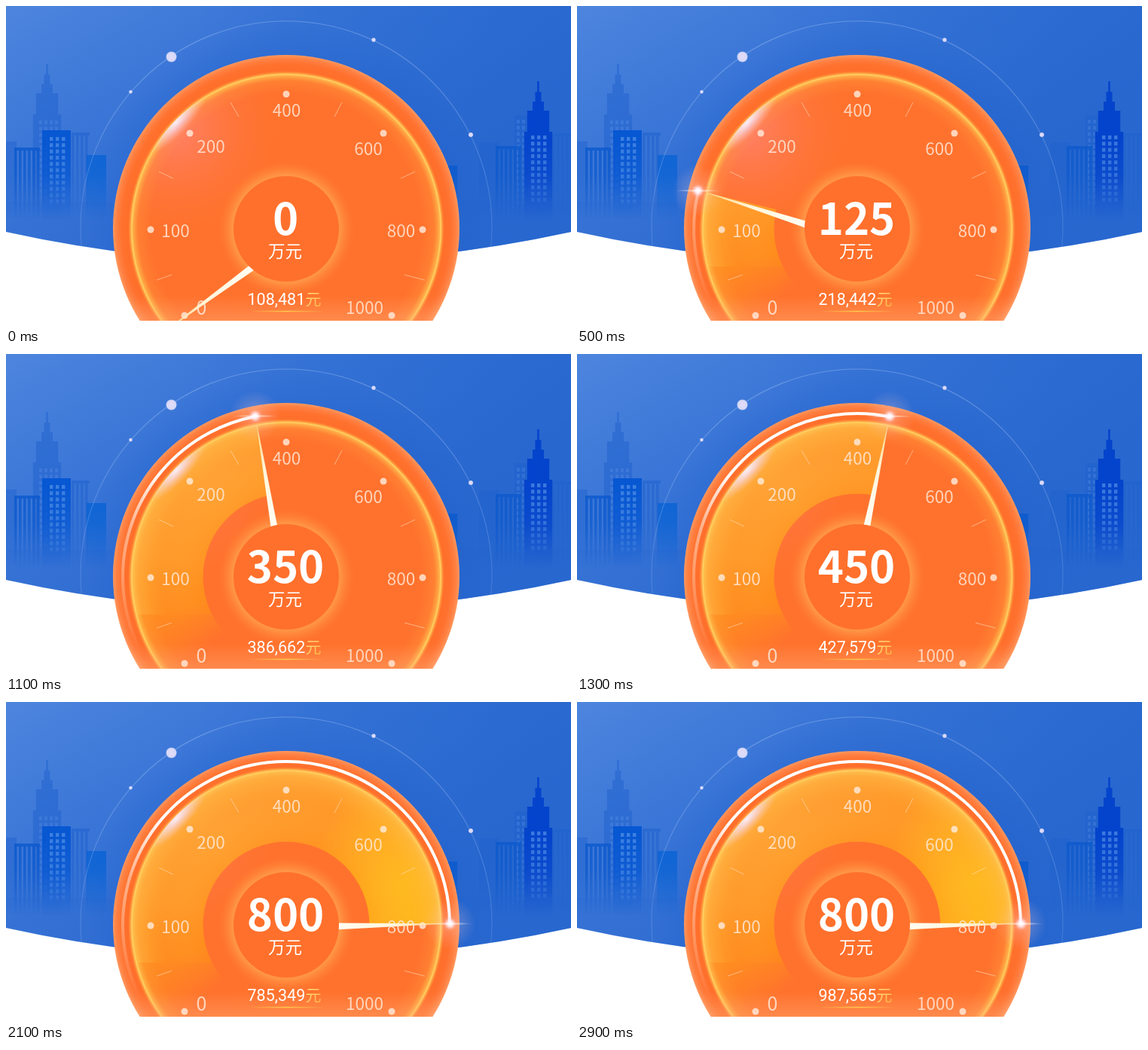
Write an HTML page with a canvas that moves like this. It is 750x425 px and loops after 3000 ms.

```html
<!DOCTYPE html>
<html lang="zh">
<head>
<meta charset="utf-8">
<title>Gauge</title>
<style>
html, body { margin: 0; width: 100%; height: 100%; overflow: hidden; background: #fff; }
canvas { display: block; width: 750px; height: 425px; }
</style>
</head>
<body>
<canvas id="stage" width="750" height="425"></canvas>
<script>
const g = document.getElementById('stage').getContext('2d');
const W = 750, H = 425, CX = 372, CY = 296, FLOOR = 418;
const LOOP = 3000, STEP = 100;
const CJK = '"Noto Sans CJK SC", "Noto Sans CJK", sans-serif';
const DIGITS = 'Roboto, "Liberation Sans", sans-serif';

// [ms, needle foot angle, needle tip angle]; degrees clockwise from due left
const POSES = [[0, -48.6, -40.3], [500, 4.9, 13.5], [800, 39.8, 45.6],
  [1300, 100.8, 101.4], [1700, 147, 145], [2000, 181.5, 179.6]];
const VALUE = [[0, 0], [800, 200], [2000, 800]];
const AMOUNT = [[0, 108481], [500, 218442], [800, 325286], [1300, 427579],
  [1700, 614349], [2100, 785349], [2900, 987565]];

function sample(table, t, col = 1) {
  let i = 1;
  while (i < table.length - 1 && t > table[i][0]) i++;
  const a = table[i - 1], b = table[i];
  const k = Math.min(1, (t - a[0]) / (b[0] - a[0]));
  return a[col] + (b[col] - a[col]) * k;
}

const rad = deg => (deg + 180) * Math.PI / 180;
const polar = (r, deg) => [CX + r * Math.cos(rad(deg)), CY + r * Math.sin(rad(deg))];

function withStops(grad, stops) {
  stops.forEach(([k, c]) => grad.addColorStop(k, c));
  return grad;
}
const linear = (x0, y0, x1, y1, ...s) => withStops(g.createLinearGradient(x0, y0, x1, y1), s);
const radial = (x, y, r0, r1, ...s) => withStops(g.createRadialGradient(x, y, r0, x, y, r1), s);
const conic = (...s) => withStops(g.createConicGradient(rad(-60), CX, CY),
  s.map(([deg, c]) => [(deg + 60) / 360, c]));

function disc(x, y, r, fill) {
  g.fillStyle = fill;
  g.beginPath();
  g.arc(x, y, r, 0, Math.PI * 2);
  g.fill();
}

function line(x0, y0, x1, y1, stroke, width) {
  g.strokeStyle = stroke;
  g.lineWidth = width;
  g.beginPath();
  g.moveTo(x0, y0);
  g.lineTo(x1, y1);
  g.stroke();
}

function text(str, x, y, font, fill, align = 'center') {
  g.font = font;
  g.fillStyle = fill;
  g.textAlign = align;
  g.fillText(str, x, y);
}

// ---- skyline ----
const fade = (rgb, a) => linear(0, 175, 0, 285, [0, `rgba(${rgb},${a})`],
  [.45, `rgba(${rgb},${a * .8})`], [1, `rgba(${rgb},0)`]);

function block(x, y, w, h, rgb, a) {
  g.fillStyle = fade(rgb, a);
  g.fillRect(x, y, w, h);
}

function windows(x, y, cols, dx, rgb = '95,155,235', a = .6) {
  g.fillStyle = fade(rgb, a);
  for (let row = y; row < 262; row += 8.3)
    for (let c = 0; c < cols; c++) g.fillRect(x + c * dx, row, dx * .55, 5);
}

function stripes(x, y, w, rgb, a) {
  block(x, y, w, 4, rgb, a);
  for (let i = 0; i < w; i += 6) block(x + i, y + 4, 3.6, 285 - y, rgb, a);
}

function tower(x, y, s, rgb, a) {
  const tiers = [[1.3, 0, 14], [4, 14, 13], [7.5, 27, 12], [14.7, 39, 28], [18.7, 67, 150]];
  tiers.forEach(([half, top, h]) => block(x - half * s, y + top, half * 2 * s, h, rgb, a));
}

function skyline() {
  const mid = '14,92,210', pale = '30,96,205';
  block(0, 180, 14, 105, pale, .45);
  tower(54.5, 77, 1, pale, .5);
  windows(44, 152, 4, 7, '80,135,225', .45);
  stripes(87, 168, 24, pale, .55);
  stripes(11, 188, 34, '10,88,205', .85);
  block(107, 198, 26, 87, '8,98,212', .9);
  block(48, 165, 38, 120, '5,86,210', .95);
  windows(58, 174, 3, 8);

  block(628, 181, 27, 104, pale, .5);
  block(675, 145, 18, 140, pale, .55);
  windows(678, 151, 2, 7, '80,135,225', .4);
  stripes(725, 169, 25, pale, .55);
  stripes(650, 186, 34, '10,88,205', .8);
  block(586, 212, 13, 73, '8,88,205', .9);
  tower(706.5, 100, 1, '4,68,204', 1);
  windows(697, 172, 3, 8);
  block(0, 260, 142, 25, pale, .5);
  block(600, 258, 150, 27, pale, .5);
}

function backdrop() {
  g.fillStyle = '#fff';
  g.fillRect(0, 0, W, H);
  g.save();
  g.beginPath();
  g.moveTo(0, 0);
  g.lineTo(W, 0);
  g.lineTo(W, 300);
  g.quadraticCurveTo(373, 382, 0, 300);
  g.clip();
  g.fillStyle = linear(0, 0, 250, 420, [0, '#4d85de'], [.45, '#3874d6'], [1, '#2966cd']);
  g.fillRect(0, 0, W, H);
  g.fillStyle = linear(250, 0, W, 0, [0, 'rgba(38,104,208,0)'], [1, 'rgba(38,104,208,.6)']);
  g.fillRect(0, 0, W, H);
  disc(CX, 293, 273, radial(CX, 293, 225, 273, [0, 'rgba(30,95,205,.25)'], [1, 'rgba(30,95,205,0)']));
  skyline();
  g.strokeStyle = linear(0, 20, 0, 320, [0, 'rgba(190,215,255,.32)'], [1, 'rgba(190,215,255,.16)']);
  g.lineWidth = 1.2;
  g.beginPath();
  g.arc(CX, 293, 273, 0, Math.PI * 2);
  g.stroke();
  g.restore();
  [[219.5, 67.5, 7], [488, 45, 2.7], [165.5, 114, 2.3], [617, 171, 3]].forEach(([x, y, r]) =>
    disc(x, y, r, radial(x, y, 0, r, [0, '#e2dcf8'], [.8, '#d9d8f7'], [1, '#b9c8f2'])));
}

// ---- dial ----
function face() {
  disc(CX, 295, 230, radial(CX, 295, 200, 230, [0, '#ff6c29'], [.6, '#ff712e'],
    [.85, '#ff8143'], [1, '#ff985f']));
  disc(CX, CY, 205, '#ff722d');
  disc(CX, CY, 205, radial(225, 165, 0, 150, [0, 'rgba(255,132,118,.8)'],
    [.4, 'rgba(255,125,90,.5)'], [1, 'rgba(255,114,45,0)']));
}

function sector(end) {
  g.beginPath();
  g.arc(CX, CY, 205, rad(-55), rad(end));
  g.arc(CX, CY, 110.5, rad(end), rad(-55), true);
  g.closePath();
  g.fillStyle = conic([-42, 'rgba(255,146,30,0)'], [-15, 'rgba(255,146,30,.85)'],
    [10, '#ff9a2c'], [50, '#ffa235'], [85, '#ff9c30'], [112, '#ff9829'],
    [138, '#ffad23'], [160, '#ffb920'], [180, '#ffb71f']);
  g.fill();
  g.fillStyle = radial(CX, CY, 110, 205, [0, 'rgba(255,140,20,.35)'],
    [.55, 'rgba(255,170,50,0)'], [1, 'rgba(255,205,85,.4)']);
  g.save();
  g.clip();
  g.fillRect(CX - 210, CY - 210, 420, 260);
  g.restore();
}

function rimLight() {
  disc(CX, CY, 210, radial(CX, CY, 180, 210, [0, 'rgba(255,175,70,0)'],
    [.55, 'rgba(255,175,70,.22)'], [.78, 'rgba(255,195,80,.75)'], [.84, '#ffd368'],
    [.89, 'rgba(255,190,75,.7)'], [1, 'rgba(255,150,60,0)']));
  g.save();
  g.beginPath();
  g.arc(CX, CY, 206, 0, Math.PI * 2);
  g.clip();
  g.translate(...polar(203, 44));
  g.rotate(rad(44));
  g.scale(.28, 1);
  disc(0, 0, 56, radial(0, 0, 0, 56, [0, 'rgba(250,240,255,.95)'],
    [.35, 'rgba(246,220,250,.65)'], [1, 'rgba(255,200,190,0)']));
  g.restore();
}

function marks() {
  const ink = 'rgba(255,236,222,.8)';
  [[372, 117], [244, 169], [501, 169], [192, 297], [553, 297], [237, 411], [512, 411]]
    .forEach(([x, y]) => disc(x, y, 4.5, ink));
  [[298, 128, 309, 147], [446, 128, 436, 147], [203, 220, 222, 229], [543, 220, 524, 229],
    [200, 364, 220, 357], [556, 364, 529, 357]]
    .forEach(p => line(...p, 'rgba(255,222,190,.6)', 1));
  [['400', 372.5, 147], ['200', 272, 195], ['100', 225, 307], ['600', 481, 198],
    ['800', 524.5, 307], ['1000', 476, 409]]
    .forEach(([s, x, y]) => text(s, x, y, '22.5px ' + CJK, ink));
  text('0', 259.5, 410, '25px ' + CJK, ink);
}

function needle(foot, tip) {
  const [x0, y0] = polar(68, foot), [x1, y1] = polar(204, tip);
  const len = Math.hypot(x1 - x0, y1 - y0);
  const nx = (y0 - y1) / len, ny = (x1 - x0) / len;
  g.fillStyle = linear(x0, y0, x1, y1, [0, '#fffdf2'], [.55, '#fff6dc'], [1, 'rgba(255,226,150,.85)']);
  g.beginPath();
  g.moveTo(x0 + nx * 4.4, y0 + ny * 4.4);
  g.lineTo(x1 + nx * .4, y1 + ny * .4);
  g.lineTo(x1 - nx * .4, y1 - ny * .4);
  g.lineTo(x0 - nx * 4.4, y0 - ny * 4.4);
  g.fill();
}

function trail(end) {
  g.strokeStyle = conic([-28, 'rgba(255,255,255,0)'], [0, 'rgba(255,240,225,.32)'],
    [18, 'rgba(255,245,235,.5)'], [38, 'rgba(255,255,255,.95)'], [50, '#fff'], [200, '#fff']);
  g.lineWidth = 4;
  g.beginPath();
  g.arc(CX, CY, 217, rad(-28), rad(Math.max(end, -28)));
  g.stroke();
}

function flare(deg) {
  const [x, y] = polar(217.5, deg);
  disc(x, y, 34, radial(x, y, 0, 34, [0, 'rgba(255,225,235,.55)'],
    [.35, 'rgba(255,205,205,.22)'], [1, 'rgba(255,200,200,0)']));
  disc(x, y, 8, radial(x, y, 0, 8, [0, '#fff'], [.35, 'rgba(255,248,255,.9)'], [1, 'rgba(255,225,245,0)']));
  g.save();
  g.translate(x, y);
  g.scale(1, .06);
  disc(0, 0, 30, radial(0, 0, 0, 30, [0, 'rgba(255,255,255,.7)'], [1, 'rgba(255,255,255,0)']));
  g.restore();
}

function hub(t) {
  disc(CX, CY, 70, '#ff702c');
  text(Math.round(sample(VALUE, t)), 371, 304, 'bold 58px ' + CJK, '#fff');
  text('万元', 370.5, 333.5, '22.5px ' + CJK, '#fff');
}

function amount(t) {
  const n = String(Math.round(sample(AMOUNT, t)));
  text(n.slice(0, 3) + ',' + n.slice(3), 320.5, 397, '21.5px ' + DIGITS, '#fff', 'left');
  text('元', 408, 397, '21px ' + CJK, linear(398, 380, 418, 398, [0, '#ffe28c'], [1, '#ffb545']));
  line(322, 405.5, 422, 405.5, linear(322, 0, 422, 0, [0, 'rgba(255,205,80,0)'],
    [.5, '#ffca50'], [1, 'rgba(255,205,80,0)']), 1.5);
}

function draw(t) {
  const foot = sample(POSES, t, 1), tip = sample(POSES, t, 2);
  backdrop();
  g.save();
  g.beginPath();
  g.rect(0, 0, W, FLOOR);
  g.clip();
  face();
  if (t > 0) sector(tip);
  rimLight();
  disc(CX, CY, 90, radial(CX, CY, 66, 90, [0, 'rgba(255,172,90,.85)'],
    [.3, 'rgba(255,160,78,.65)'], [1, 'rgba(255,130,50,0)']));
  g.save();
  g.beginPath();
  g.arc(CX, 295, 230, 0, Math.PI * 2);
  g.clip();
  g.fillStyle = linear(0, 385, 0, FLOOR, [0, 'rgba(255,175,125,0)'], [1, 'rgba(255,175,125,.4)']);
  g.fillRect(0, 385, W, FLOOR - 385);
  g.restore();
  marks();
  needle(foot, tip);
  if (t > 0) trail(tip);
  hub(t);
  amount(t);
  g.restore();
  if (t > 0) flare(tip);
}

const start = performance.now();
let shown = -1;
function tick() {
  const t = Math.floor((performance.now() - start) % LOOP / STEP) * STEP;
  if (t !== shown) draw(shown = t);
  requestAnimationFrame(tick);
}
tick();
</script>
</body>
</html>
```
